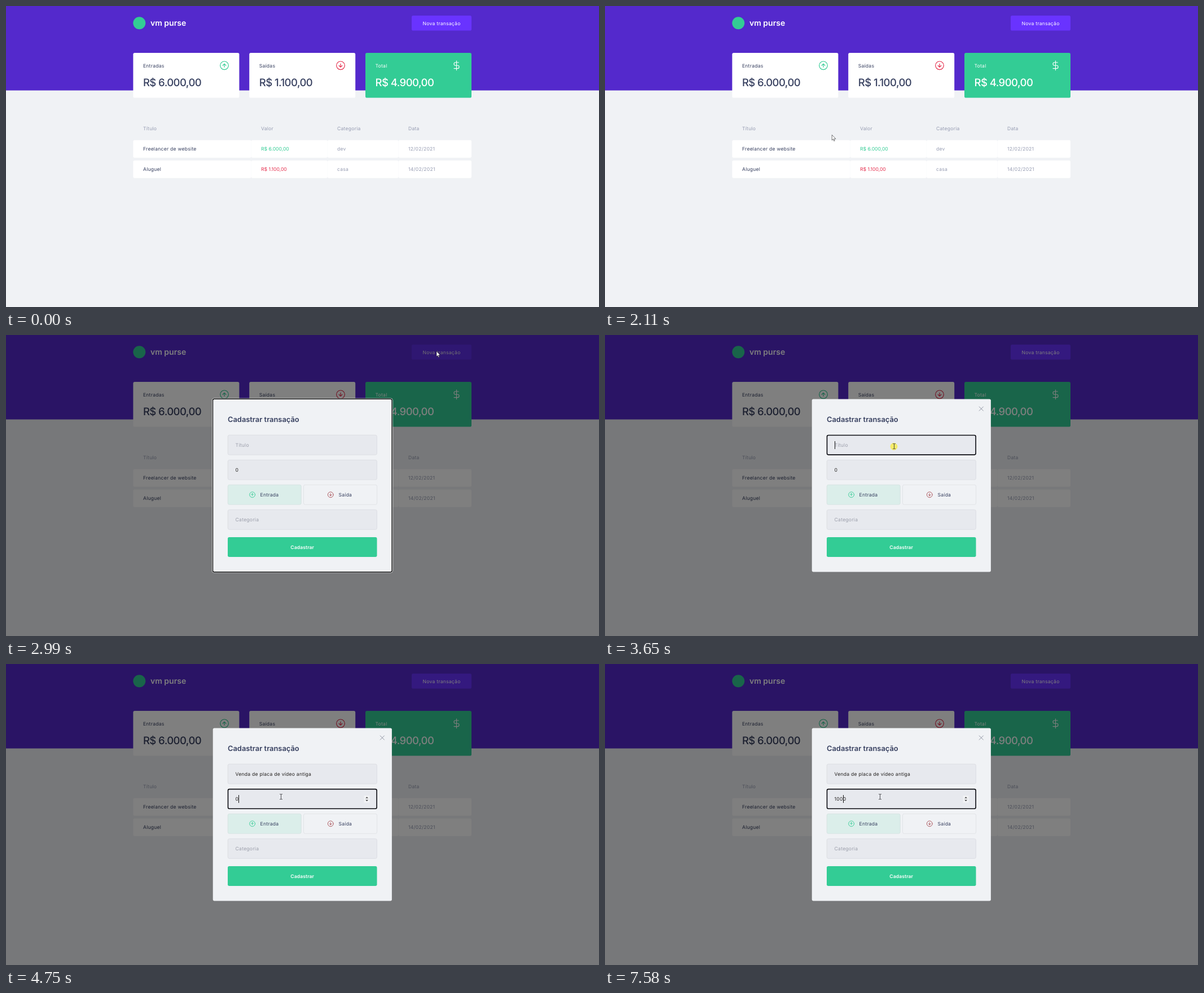
Write an HTML page with a canvas that moves like this. It is 1051 px wide and 533 px high and loops after 8 s.

```html
<!DOCTYPE html>
<html lang="pt-BR">
<head>
<meta charset="utf-8">
<title>Transações</title>
<style>
  html, body { margin: 0; width: 100%; height: 100%; overflow: hidden; background: #f0f2f5; }
  canvas { display: block; width: 1051px; height: 533px; }
</style>
</head>
<body>
<canvas></canvas>
<script>
const LOOP = 8000, W = 1051, H = 533;
const GREEN = '#33cc95', RED = '#e52e4d', INK = '#363f5f', MUTED = '#969cb2', PAGE = '#f0f2f5';
const canvas = document.querySelector('canvas');
const ctx = canvas.getContext('2d');
const ratio = window.devicePixelRatio || 1;
canvas.width = W * ratio;
canvas.height = H * ratio;

// Pointer stops: time, x, y, easing towards this stop
const linear = p => p;
const smooth = p => p * p * (3 - 2 * p);
const slowDown = p => 1 - (1 - p) ** 2;
const pointerStops = [
  [390, 1051, 530, linear], [850, 482, 297, slowDown], [1180, 482, 297, linear],
  [1720, 340, 263, linear], [1920, 340, 263, linear], [2710, 763, 29, smooth],
  [2990, 763, 29, linear], [3550, 512, 197, smooth], [3960, 512, 197, linear],
  [4190, 509, 212, smooth], [4650, 487, 235, smooth], [LOOP, 487, 235, linear]
];
const presses = [[1030, 1750], [2760, 2900], [3600, 3750], [4650, 4740]];

// Amount field: time, text, caret index (-1 = caret hidden)
const amountStates = [
  [0, '0', -1], [4650, '0', 1], [5180, '0', -1], [5540, '0', 0], [5900, '10', 1],
  [6460, '10', -1], [6970, '10', 1], [7200, '100', 2], [7580, '1000', 3]
];

const during = (t, from, to) => t >= from && t < to;
const clamp = v => Math.max(0, Math.min(1, v));

function box(x, y, w, h, fill, stroke, radius = 2.7, lineWidth = 0.6) {
  ctx.beginPath();
  ctx.roundRect(x, y, w, h, radius);
  if (fill) { ctx.fillStyle = fill; ctx.fill(); }
  if (stroke) { ctx.strokeStyle = stroke; ctx.lineWidth = lineWidth; ctx.stroke(); }
}

function setFont(size, weight, spacing) {
  ctx.font = `${weight} ${size}px Inter, "Open Sans", sans-serif`;
  ctx.letterSpacing = `${spacing}px`;
  ctx.textRendering = 'geometricPrecision';
}

function label(text, x, y, color, { size = 8.57, weight = 400, spacing = 0.25, align = 'left' } = {}) {
  setFont(size, weight, spacing);
  ctx.textAlign = align;
  ctx.fillStyle = color;
  ctx.fillText(text, x, y);
}

function textWidth(text, spacing = 0.25) {
  setFont(8.57, 400, spacing);
  return ctx.measureText(text).width;
}

function icon(path, x, y, scale, stroke, lineWidth, fill) {
  const shape = new Path2D(path);
  ctx.save();
  ctx.translate(x, y);
  ctx.scale(scale, scale);
  ctx.lineCap = ctx.lineJoin = 'round';
  if (fill) { ctx.fillStyle = fill; ctx.fill(shape); }
  ctx.strokeStyle = stroke;
  ctx.lineWidth = lineWidth / scale;
  ctx.stroke(shape);
  ctx.restore();
}

function circledArrow(x, y, r, color, down, lineWidth) {
  const s = down ? 1 : -1;
  icon(`M10 0A10 10 0 1 1 -10 0A10 10 0 1 1 10 0M0 ${-4 * s}V${4 * s}M-4 0L0 ${4 * s}L4 0`,
    x, y, r / 10, color, lineWidth);
}

function focusRing(x, y, w, h) {
  box(x - 1.2, y - 1.2, w + 2.4, h + 2.4, null, '#fff', 3, 0.9);
  box(x - 0.2, y - 0.2, w + 0.4, h + 0.4, null, '#101010', 2.5, 1.4);
}

function caret(x, y) {
  ctx.fillStyle = '#111';
  ctx.fillRect(Math.round(x), y, 1, 14);
}

function drawHeader(t) {
  ctx.fillStyle = PAGE;
  ctx.fillRect(0, 0, W, H);
  ctx.fillStyle = '#5429cc';
  ctx.fillRect(0, 0, W, 149.5);
  box(225.3, 19.3, 22, 22, GREEN, null, 11);
  label('vm purse', 256, 35, '#fff', { size: 14, weight: 600, spacing: 0 });

  const hover = clamp((t - 2580) / 200) - clamp((t - 2990) / 200);
  const dim = v => Math.round(v * (1 - 0.1 * hover));
  box(719, 17, 106, 26.6, `rgb(${dim(105)},${dim(51)},${dim(255)})`);
  label('Nova transação', 772, 33.6, `rgb(${dim(255)},${dim(255)},${dim(255)})`, { align: 'center' });
  if (during(t, 2760, 2990)) focusRing(719, 17, 106, 26.6);
}

function drawCard(x, title, value, fill, color) {
  box(x, 83, 188, 79.6, fill);
  label(title, x + 17.5, 108.5, color);
  label(value, x + 17.5, 142.4, color, { size: 18.5, weight: 500, spacing: -0.55 });
}

function drawCards() {
  drawCard(225.4, 'Entradas', 'R$ 6.000,00', '#fff', INK);
  drawCard(431.2, 'Saídas', 'R$ 1.100,00', '#fff', INK);
  drawCard(637, 'Total', 'R$ 4.900,00', GREEN, '#fff');
  circledArrow(387, 105.3, 7.3, GREEN, false, 1.2);
  circledArrow(593, 105.3, 7.3, RED, true, 1.2);
  icon('M0 -11V11M5 -7H-2.5A3.5 3.5 0 0 0 -2.5 0H2.5A3.5 3.5 0 0 1 2.5 7H-6',
    798.5, 105.3, 0.76, '#fff', 1.1);
}

const columns = [243, 452, 587, 713];
const cellEdges = [225.4, 434.6, 569.8, 695.5, 825];

function drawRow(y, texts, valueColor) {
  const colors = [INK, valueColor, MUTED, MUTED];
  texts.forEach((text, i) => {
    box(cellEdges[i], y, cellEdges[i + 1] - cellEdges[i], 31.2, '#fff');
    label(text, columns[i], y + 18.6, colors[i], { spacing: i === 1 ? 0 : 0.25 });
  });
}

function drawTable() {
  ['Título', 'Valor', 'Categoria', 'Data'].forEach((text, i) => label(text, columns[i], 220.4, MUTED));
  drawRow(237.5, ['Freelancer de website', 'R$ 6.000,00', 'dev', '12/02/2021'], GREEN);
  drawRow(273.5, ['Aluguel', 'R$ 1.100,00', 'casa', '14/02/2021'], RED);
}

function drawSelection(pointerX) {
  const text = 'R$ 1.100,00', end = 8;
  const edge = i => columns[1] + textWidth(text.slice(0, i), 0);
  let start = 0;
  while (start < end && edge(start) < pointerX + 2.5) start++;
  if (start === end) return;
  ctx.save();
  ctx.beginPath();
  ctx.rect(edge(start), 282, edge(end) - edge(start), 14);
  ctx.fillStyle = '#2f8ffb';
  ctx.fill();
  ctx.clip();
  label(text, columns[1], 292.1, '#fff', { spacing: 0 });
  ctx.restore();
}

function drawField(y, text, color, focused) {
  box(393.2, y, 264.2, 35, '#e7e9ee', '#d3d5da');
  if (focused) box(393.5, y + 0.3, 263.6, 34.6, null, '#0c0d12', 2.5, 1.6);
  label(text, 406.6, y + 20.7, color);
}

function drawModal(t) {
  const titleFocused = during(t, 3600, 4650), amountFocused = t >= 4650;
  const title = t >= 3960 ? 'Venda de placa de vídeo antiga' : '';
  const [, amount, caretIndex] = amountStates.findLast(state => t >= state[0]);

  ctx.fillStyle = 'rgba(0,0,0,0.5)';
  ctx.fillRect(0, 0, W, H);
  box(366.7, 113.5, 317.2, 306, PAGE);
  if (t < 3600) focusRing(366.7, 113.5, 317.2, 306);
  if (t >= 3040) icon('M-1 -1L1 1M1 -1L-1 1', 666.8, 130.6, 3.6, '#858a99', 0.9);
  label('Cadastrar transação', 393, 154.2, INK, { size: 12.86, weight: 600, spacing: 0 });

  drawField(177.2, title || 'Título', title ? '#24211f' : '#9c9fab', titleFocused);
  if (titleFocused) caret(406.6 + textWidth(title), 188);
  drawField(221.3, amount, '#24211f', amountFocused);
  if (caretIndex >= 0) caret(406.6 + textWidth(amount.slice(0, caretIndex)), 232);
  if (t >= 4600) {
    box(634.5, 233, 10, 12.5, '#f1f2f4', null, 0);
    icon('M-2 -2L0 -4L2 -2ZM-2 2L0 4L2 2Z', 639.6, 239.1, 0.9, '#222', 0.3, '#222');
  }

  box(393.2, 265.3, 130, 35, '#dbeeea', '#cfdcdb');
  box(527.5, 265.3, 130, 35, null, '#d7d9dd');
  circledArrow(436.6, 282.8, 4.9, GREEN, false, 0.9);
  circledArrow(575.3, 282.8, 4.9, '#a5474f', true, 0.9);
  label('Entrada', 450.5, 286, INK);
  label('Saída', 589.5, 286, INK);
  drawField(309.4, 'Categoria', '#9c9fab', false);
  box(393, 358, 264.5, 35, GREEN);
  label('Cadastrar', 525.2, 378.8, '#fff', { weight: 600, spacing: 0.1, align: 'center' });
}

function pointerAt(t) {
  const next = pointerStops.findIndex(stop => stop[0] > t);
  if (next < 1) return null;
  const [t0, x0, y0] = pointerStops[next - 1];
  const [t1, x1, y1, ease] = pointerStops[next];
  const p = ease((t - t0) / (t1 - t0));
  return { x: x0 + (x1 - x0) * p, y: y0 + (y1 - y0) * p };
}

function drawPointer(t, { x, y }) {
  if (presses.some(([from, to]) => during(t, from, to))) {
    ctx.fillStyle = 'rgba(250,235,50,0.7)';
    ctx.beginPath();
    ctx.arc(x, y + 0.5, 6.5, 0, 7);
    ctx.fill();
  }
  const overText = during(t, 1190, 1500) && x > 446;
  const overField = t > 3000 && x < 657 && y > 177;
  const overButton = t > 2000 && t < 2990 && x > 719 && y < 44;
  if (overText || overField) {
    icon('M-2 -4.5H-.7L0 -4L.7 -4.5H2M0 -4V4M-2 4.5H-.7L0 4L.7 4.5H2', x + 0.5, y, 1, '#3c3c40', 0.9);
  } else if (overButton) {
    icon('M-.8 1Q.4 -.2 1.4 1V5L5 5.8Q6.2 6.3 6 8L5 12H.5L-3 8Q-3.4 6.5 -2 6.5L-.8 7.5Z',
      x + 0.5, y, 1, '#222', 0.6, '#fff');
  } else {
    icon('M0 0V9L2.1 7.2L3.6 10.6L5 10L3.5 6.7H6.4Z', x, y, 1, '#222', 0.6, '#fff');
  }
}

function draw(t) {
  ctx.setTransform(ratio, 0, 0, ratio, 0, 0);
  const pointer = pointerAt(t);
  drawHeader(t);
  drawCards();
  drawTable();
  if (during(t, 1180, 1720)) drawSelection(pointer.x);
  if (t >= 2990) drawModal(t);
  if (pointer) drawPointer(t, pointer);
}

const startTime = performance.now();
function tick() {
  draw((performance.now() - startTime) % LOOP);
  requestAnimationFrame(tick);
}
tick();
</script>
</body>
</html>
```
